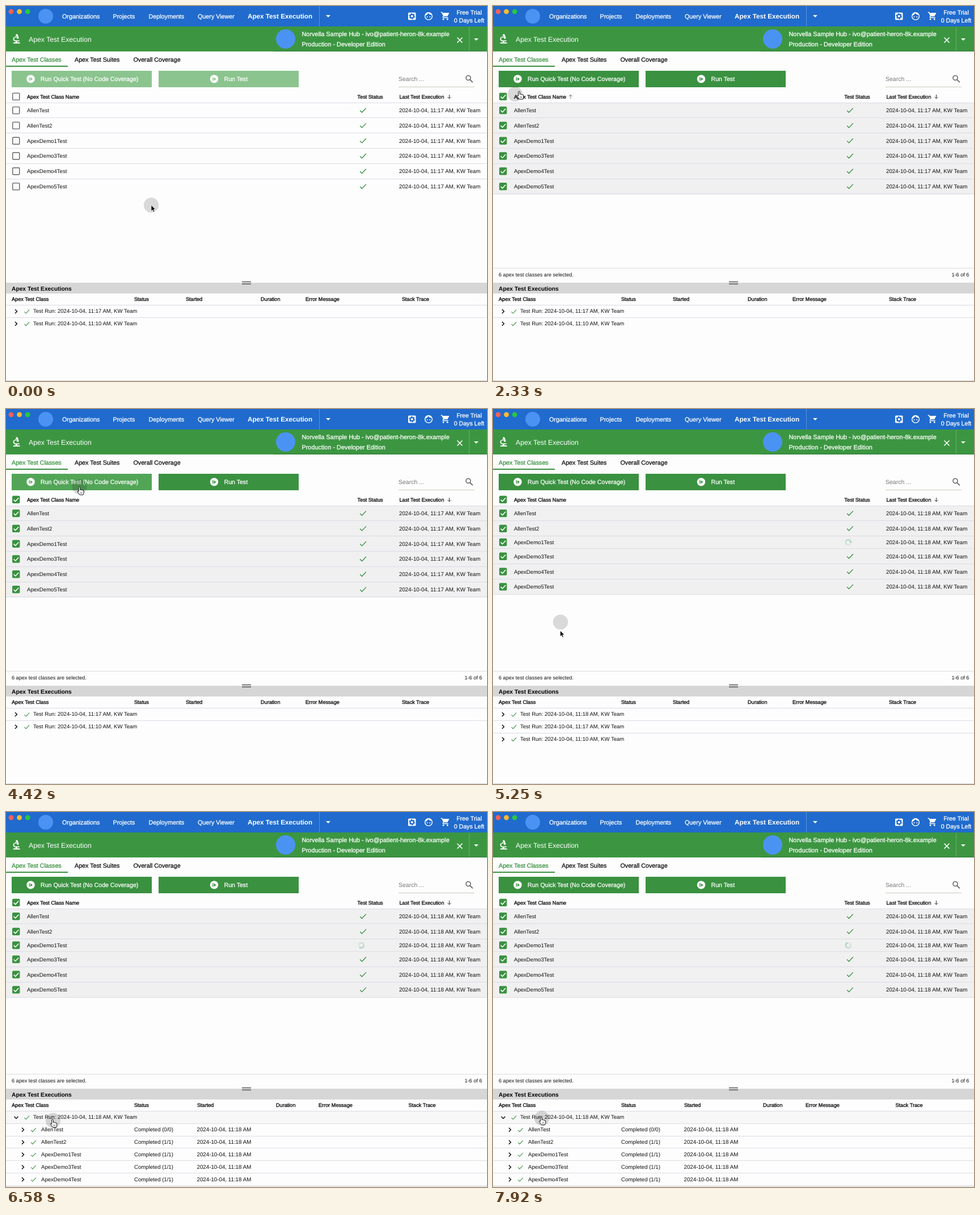
An HTML page that plays this animation: 848 by 660 pixels, repeating every 8000 ms.

```html
<!DOCTYPE html>
<html lang="en">
<head>
<meta charset="utf-8">
<title>Test execution</title>
<style>
html, body { margin: 0; width: 100%; height: 100%; overflow: hidden; background: #fdfdfe; }
svg { display: block; }
text { font-family: "Liberation Sans", Arial, sans-serif; white-space: pre; text-rendering: geometricPrecision; }
</style>
</head>
<body>
<svg id="stage" width="848" height="660" viewBox="0 0 848 660">
  <g id="fixed"></g>
  <g id="live"></g>
</svg>
<script>
const LOOP = 8000, STEP = 1000 / 12;
const SELECT = 1600, RERUN = 4570, EXPAND = 6320, CLICK = 3660;
const GREEN = '#3a9140', INK = '#111', LINE = '#dcdce4';
const USER = 'KW Team';
const CLASSES = ['AllenTest', 'AllenTest2', 'ApexDemo1Test', 'ApexDemo3Test', 'ApexDemo4Test', 'ApexDemo5Test'];

// ---- drawing helpers ----
const text = (x, cy, size, str, { fill = INK, medium, bold, mid } = {}) =>
  `<text x="${x}" y="${cy + size * 0.355}" font-size="${size}" fill="${fill}"` +
  (medium ? ` stroke="${fill}" stroke-width=".28"` : '') +
  (bold ? ' font-weight="700"' : '') +
  (mid ? ' text-anchor="middle"' : '') + `>${str}</text>`;
const rect = (x, y, w, h, fill, extra = '') =>
  `<rect x="${x}" y="${y}" width="${w}" height="${h}" fill="${fill}" ${extra}/>`;
const circle = (x, y, r, fill, extra = '') =>
  `<circle cx="${x}" cy="${y}" r="${r}" fill="${fill}" ${extra}/>`;
const path = (d, fill, extra = '') => `<path d="${d}" fill="${fill}" ${extra}/>`;
const stroke = (d, color, w) => path(d, 'none', `stroke="${color}" stroke-width="${w}"`);
const at = (x, y, k, body) => `<g transform="translate(${x} ${y}) scale(${k})">${body}</g>`;
const hline = (y, color = LINE) => rect(0, Math.floor(y), 848, 1, color);
const head = (x, y, str) => text(x, y, 9.15, str, { medium: true, fill: '#000' });
const tick = (x, y, k = 1) => at(x, y, k, stroke('M-5.2 .3L-1.8 3.7 5.6-4', GREEN, 1.35));
const caret = (x, y) => path(`M${x - 4} ${y - 2}h8l-4 4z`, '#fff');

// ---- time helpers ----
const ramp = (t, a, b) => Math.min(1, Math.max(0, (t - a) / (b - a)));
const mix = (a, b, u) => 'rgb(' + a.map((v, i) => Math.round(v + (b[i] - v) * u)) + ')';

// Pointer path: time, x, y of the hot spot
const KEYS = [
  [0, 256, 350.5], [340, 256, 350.5], [700, 150, 262], [1000, 47, 177], [1080, 40, 174.5],
  [1400, 20, 161], [1560, 18, 159], [2000, 19, 159], [2250, 39, 155], [2333, 46, 150.5],
  [2700, 105, 142], [3050, 129.5, 137], [4400, 129.5, 137], [4800, 122, 265],
  [5167, 119, 375], [5250, 118.5, 390], [5600, 100, 490], [5900, 86, 550], [6150, 83, 544],
  [6500, 83, 543], [6583, 82, 541.5], [6900, 82, 541.5], [7300, 88, 610], [7450, 89, 643],
  [7700, 87, 560], [7833, 86, 539], [7917, 85, 537], [8000, 85, 537]
];

function slope(i, axis) {
  const p = KEYS[i - 1], k = KEYS[i], n = KEYS[i + 1];
  if (!p || !n || (k[axis] - p[axis]) * (n[axis] - k[axis]) <= 0) return 0;
  return (n[axis] - p[axis]) / (n[0] - p[0]);
}

function pointer(t) {
  t = Math.max(0, t);
  let i = 0;
  while (i < KEYS.length - 2 && KEYS[i + 1][0] <= t) i++;
  const a = KEYS[i], b = KEYS[i + 1], d = b[0] - a[0], u = Math.min(1, (t - a[0]) / d);
  const u2 = u * u, u3 = u2 * u;
  return [1, 2].map(c =>
    (2 * u3 - 3 * u2 + 1) * a[c] + (u3 - 2 * u2 + u) * d * slope(i, c) +
    (3 * u2 - 2 * u3) * b[c] + (u3 - u2) * d * slope(i + 1, c));
}

// ---- unchanging parts ----
function topBar() {
  const white = { fill: '#fff', medium: true };
  let s = rect(0, 0, 848, 36, '#206bcd');
  ['#fe5f57', '#febc2e', '#28c840'].forEach((c, i) => s += circle(9 + i * 14.6, 9.8, 4.4, c));
  s += circle(70, 18, 13, '#4b93f2');
  [[99, 'Organizations'], [188.5, 'Projects'], [251.5, 'Deployments'], [338, 'Query Viewer']]
    .forEach(([x, label]) => s += text(x, 18, 10.75, label, white));
  s += text(426, 18, 11.7, 'Apex Test Execution', { fill: '#fff', bold: true });
  s += rect(552, 0, 1, 36, '#5b92dc') + caret(568, 18);
  // settings, face, cart
  s += rect(709, 11.5, 13.5, 13, '#fff', 'rx="1.5"') +
    circle(715.7, 18, 3.2, 'none', 'stroke="#206bcd" stroke-width="2.2"') +
    circle(715.7, 18, 4.6, 'none', 'stroke="#206bcd" stroke-width="1.4" stroke-dasharray="2.4 2.42"');
  s += circle(745, 18, 6.4, 'none', 'stroke="#fff" stroke-width="1.4"') +
    path('M738.8 17Q743 16 744 12.5 747 16 751.3 15.6L749 12 744 10.8 740 13z', '#fff') +
    circle(742.6, 19, 0.95, '#fff') + circle(747.4, 19, 0.95, '#fff');
  s += at(766, 9, 0.72, path('M7 18a2 2 0 1 0 0 4a2 2 0 0 0 0-4zM1 2v2h2l3.6 7.6-1.4 2.4c-.7 1.4.3 3 1.8 3h12v-2H7.4l-.2-.4.9-1.6h7.5c.7 0 1.4-.4 1.7-1l3.6-6.5c.4-.7-.1-1.5-.9-1.5H5.2l-.9-2zM17 18a2 2 0 1 0 0 4a2 2 0 0 0 0-4z', '#fff'));
  s += text(816.5, 11.5, 10.6, 'Free Trial', { fill: '#fff', medium: true, mid: true });
  s += text(816.5, 25.3, 10.6, '0 Days Left', { fill: '#fff', medium: true, mid: true });
  return s;
}

function orgBar() {
  const white = { fill: '#fff', medium: true };
  let s = rect(0, 36, 848, 44, '#3c9641') + rect(472, 79, 376, 1, '#2c7a32');
  s += at(8.2, 47.4, 0.88,
    path('M7 19c-1.1 0-2 .9-2 2h14c0-1.1-.9-2-2-2h-4v-2h3c1.1 0 2-.9 2-2h-8c-1.7 0-3-1.3-3-3 0-1.1.6-2 1.5-2.6C8.2 9 8 8.5 8 8l.1-.6C6.3 8.1 5 9.9 5 12c0 2.8 2.2 5 5 5v2z', '#fff') +
    path('M10.6 5.5C11.9 5.5 13 6.6 13 8c0 .8-.3 1.4-.8 1.9l.5 1.6 1-.3.3.9 1.9-.7-.3-.9.9-.4-2.7-7.5-1 .3-.3-.9-1.9.7.4.9-1 .4z', '#fff') +
    circle(10.5, 8, 1.5, '#fff'));
  s += text(40, 58.5, 12.25, 'Apex Test Execution', { fill: '#fff' });
  s += circle(493, 58, 17, '#4b93f2');
  s += text(521.5, 49.5, 10.87, 'Norvella Sample Hub - ivo@patient-heron-8k.example', white);
  s += text(521.5, 67, 10.87, 'Production - Developer Edition', white);
  s += stroke('M795.5 55.5l9 9m0-9l-9 9', '#fff', 1.6);
  s += rect(816, 37, 1, 42, '#6bb06f') + caret(829, 59);
  return s;
}

function fixedParts() {
  let s = topBar() + orgBar();
  s += text(10, 94, 10.7, 'Apex Test Classes', { fill: GREEN, medium: true });
  s += text(121, 94, 10.7, 'Apex Test Suites', { medium: true });
  s += text(224.5, 94, 10.7, 'Overall Coverage', { medium: true });
  s += rect(0, 105, 109, 2, GREEN);
  s += text(692, 128.5, 10.5, 'Search ...', { fill: '#777' }) + rect(692, 142, 134, 1, '#cbc8b9');
  s += circle(815, 126.5, 4, 'none', 'stroke="#666" stroke-width="1.6"') +
    stroke('M817.8 129.3l5 5', '#666', 1.9);
  s += head(37, 159.5, 'Apex Test Class Name') + head(619.5, 159.5, 'Test Status') +
    head(693.5, 159.5, 'Last Test Execution');
  s += stroke('M781.5 156v7m-3-3l3 3 3-3', '#333', 1);
  s += rect(0, 487, 848, 19, '#d6d6d6');
  s += rect(416, 484.6, 16, 1.7, '#666') + rect(416, 488.4, 16, 1.7, '#666');
  s += text(10, 497, 10.25, 'Apex Test Executions', { bold: true, fill: '#000' });
  s += rect(0, 659, 848, 1, '#d4d4d6');
  return s;
}

// ---- changing parts ----
function button(x, iconX, labelX, label, fill) {
  const y = 128.4;
  return rect(x, 114, 247, 29, fill) + circle(iconX, y, 7.2, '#fff') +
    rect(iconX - 2.9, y - 3, 1.4, 6, fill) +
    path(`M${iconX - 0.4} ${y - 3}v6l4-3z`, fill) +
    text(labelX, 128.6, 10.6, label, { fill: '#fff', medium: true });
}

function buttons(t) {
  const base = [58, 145, 64];
  const on = ramp(t, SELECT, SELECT + 200);
  const hover = ramp(t, 2700, 2950) - ramp(t, 4480, 4700);
  const ready = mix([139, 196, 142], base, on);
  let s = button(10, 43.5, 61, 'Run Quick Test (No Code Coverage)', hover > 0 ? mix(base, [82, 165, 87], hover) : ready);
  s += button(269, 367, 384.5, 'Run Test', ready);
  const u = ramp(t, CLICK, CLICK + 550);
  if (u > 0 && u < 1)
    s += `<svg x="10" y="114" width="247" height="29">${circle(119.5, 23, 15 + 135 * u, '#fff', `opacity="${0.22 * (1 - u)}"`)}</svg>`;
  return s;
}

const checkbox = (y, on) => on
  ? rect(11, y - 6.7, 13.4, 13.4, GREEN, 'rx="1.8"') + stroke(`M13.6 ${y + 0.2}l3 3 5.6-6`, '#fff', 1.5)
  : rect(11.7, y - 6, 12, 12, 'none', 'rx="1.2" stroke="#626262" stroke-width="1.4"');

function spinner(x, y, t) {
  let s = '';
  const lead = Math.floor(t / STEP);
  for (let i = 0; i < 12; i++) {
    const age = (lead - i + 1200) % 12;
    s += `<path d="M0-3.2V-6" stroke="#5fae78" stroke-width="1.1" transform="translate(${x} ${y}) rotate(${i * 30})" opacity="${0.9 - age * 0.065}"/>`;
  }
  return s;
}

function classTable(t, [px, py]) {
  const picked = t >= SELECT, rerun = t >= RERUN;
  let s = hline(170), top = 170;
  CLASSES.forEach((name, i) => {
    const busy = rerun && i === 2;
    const h = busy ? 22.1 : 26.8, y = top + h / 2 + (busy ? -0.2 : 0.2);
    const hover = py >= top && py < top + h;
    const bg = picked ? (hover ? '#ebebed' : '#f0f0f1') : hover ? '#f5f5f7' : '';
    if (bg) s += rect(0, Math.floor(top) + 1, 848, Math.ceil(h), bg);
    top += h;
    if (i < 5 || picked) s += hline(top);
    s += checkbox(y, picked) + text(37, y, 9.6, name);
    s += busy ? spinner(626.3, y + 0.2, t) : tick(629.3, y);
    s += text(693, y, 9.75, `2024-10-04, 11:${rerun ? 18 : 17} AM, ${USER}`);
  });
  s += checkbox(159.4, picked);
  if (py > 148 && py < 170 && px > 30 && px < 600)
    s += stroke('M136.8 163v-7m-3 3l3-3 3 3', '#777', 1);
  if (picked)
    s += hline(461, '#dcdcdc') + text(10, 473, 9.1, '6 apex test classes are selected.') +
      text(808.5, 473, 9.1, '1-6 of 6');
  return s;
}

function runTree(t, py) {
  const open = t >= EXPAND, H = 21.85;
  const cols = open ? [226, 337, 476, 551, 709.5] : [226, 317, 449, 528, 698];
  let s = head(10, 515.3, 'Apex Test Class');
  ['Status', 'Started', 'Duration', 'Error Message', 'Stack Trace']
    .forEach((label, i) => s += head(cols[i], 515.3, label));
  const runs = t >= RERUN ? [18, 17, 10] : [17, 10];
  const count = open ? 6 : runs.length;
  const over = Math.floor((py - 526.3) / H);
  for (let i = 0; i < count; i++) {
    const top = 526.3 + i * H, y = top + 10.7;
    if (i === over) s += rect(0, Math.floor(top), 848, 22, '#f7f7f8');
    s += hline(top);
    const child = open && i > 0, x = child ? 30 : 18;
    s += open && !i ? stroke(`M${x - 3.5} ${y - 1}l3.5 3.5 3.5-3.5`, '#111', 1.5)
      : stroke(`M${x - 2} ${y - 3}l3.4 3.5-3.4 3.5`, '#111', 1.5);
    s += tick(child ? 48.3 : 36.7, y + 0.8, 0.8);
    if (child) {
      s += text(62, y, 9.6, CLASSES[i - 1]);
      s += text(226, y, 9.62, i === 1 ? 'Completed (0/0)' : 'Completed (1/1)');
      s += text(336.5, y, 9.75, '2024-10-04, 11:18 AM');
    } else s += text(48, y - 0.2, 9.55, `Test Run: 2024-10-04, 11:${runs[i]} AM, ${USER}`);
  }
  if (open) s += hline(657);
  return s;
}

function cursor(t, [x, y]) {
  const [cx, cy] = pointer(t - STEP);
  const hand = y < 170 || y > 526;
  return circle(cx, cy, 13.2, '#000', 'opacity=".14"') + at(x, y, 1, hand
    ? path('M-1.3 1a1.3 1.3 0 0 1 2.6 0V5q1.3-1 2.4.2 1.4-.6 2.2.6 1.8-.3 1.8 1.4v3.3L6.5 13.6h-6L-3.4 8.6q-.8-1.8.8-1.8L-1.3 8z', '#fff', 'stroke="#111" stroke-width="1"') +
      stroke('M2.2 8.5v3M4.4 8.5v3', '#333', 0.7)
    : path('M0 0V10.5L2.4 8.3 4 12.1 5.8 11.3 4.2 7.6H7.4z', '#000', 'stroke="#fff" stroke-width=".7"'));
}

const live = document.getElementById('live');
document.getElementById('fixed').innerHTML = fixedParts();

function draw(t) {
  const p = pointer(t);
  live.innerHTML = buttons(t) + classTable(t, p) + runTree(t, p[1]) + cursor(t, p);
}

let shown = -1;
function tickFrame(now) {
  const step = Math.floor((now % LOOP + 4) / STEP) % 96;
  if (step !== shown) draw((shown = step) * STEP);
  requestAnimationFrame(tickFrame);
}
draw(0);
requestAnimationFrame(tickFrame);
</script>
</body>
</html>
```
